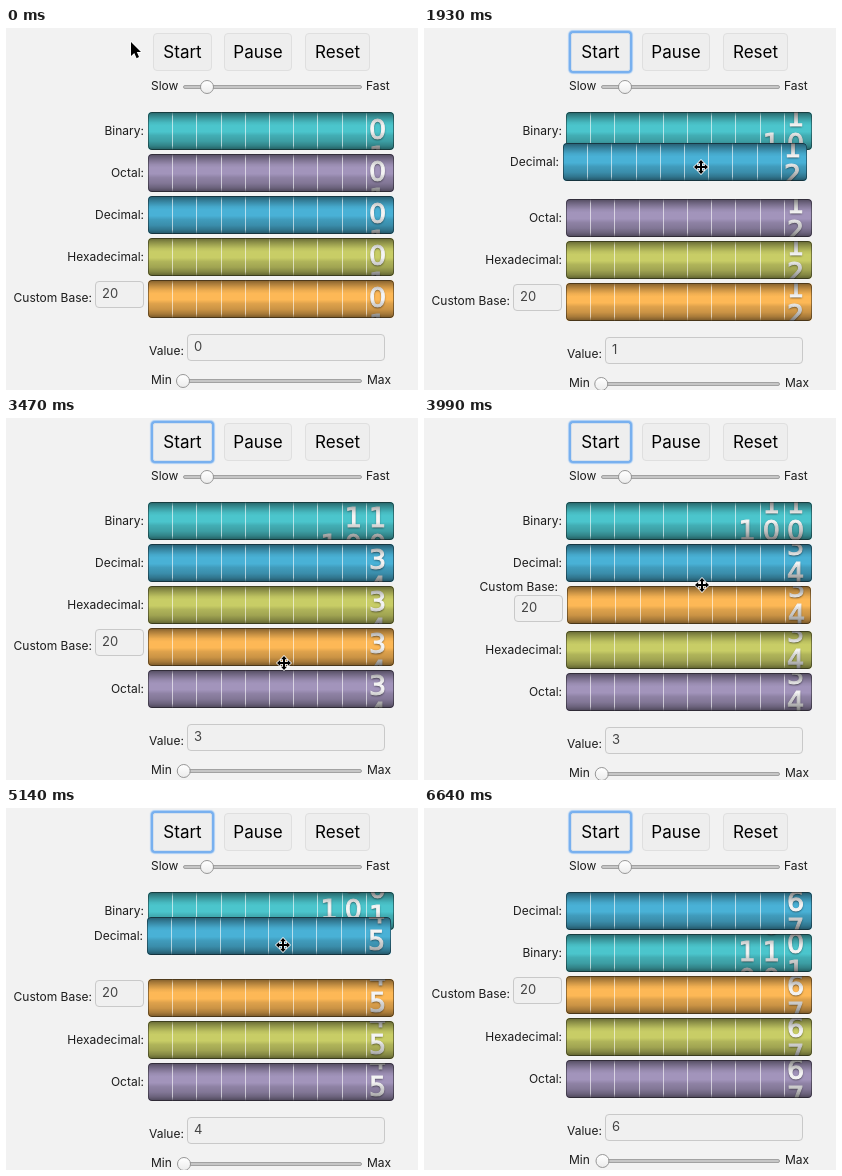
These frames come from a looping animation (412 by 362 pixels, 6.69 s). An HTML page:

```html
<!DOCTYPE html>
<html lang="en">
<head>
<meta charset="utf-8">
<title>Counters in five bases</title>
<style>
  html, body { margin: 0; width: 100%; height: 100%; overflow: hidden; }
  body { background: #f2f2f2; color: #1c1c1c; font: 12px/16px Inter, sans-serif; }
  #stage { position: relative; width: 412px; height: 362px; overflow: hidden; }
  #stage div, #stage span, #stage svg { position: absolute; box-sizing: border-box; }
  #stage span { white-space: pre; }

  .button {
    top: 5px; height: 38px; border: 1px solid #dfdfdf; border-radius: 4px;
    background: #eee; color: #000; font-size: 17px; line-height: 37px; text-align: center;
  }
  .button.focus {
    border-color: #d5e0ec; border-radius: 2px;
    box-shadow: 0 0 0 2px #78b0ef, 0 0 1px 3px #a9cdf4;
  }

  .field {
    height: 27px; border: 1px solid #c9c9c9; border-radius: 4px; background: #f0f0f0;
    color: #444; font-size: 13px; line-height: 23px; padding-left: 6px;
  }
  .track {
    left: 177px; width: 179px; height: 4px; border: 1px solid #a2a2a2;
    border-radius: 2px; background: #c6c6c6;
  }
  .knob {
    width: 14px; height: 14px; border: 1px solid #979797; border-radius: 50%;
    background: linear-gradient(#fff, #ececec);
  }

  .row { left: 0; top: 0; width: 412px; height: 38px; }
  .row.lifted { z-index: 2; }
  .label { right: 274px; top: 11px; }
  .custom .label { right: 326px; top: 10px; }
  .custom .field { left: 89px; top: 1px; width: 49px; }
  .custom.lifted .label { right: 279px; top: -7px; }
  .custom.lifted .field { top: 9px; }

  .bar { left: 142px; top: 0; width: 246px; height: 38px; border-radius: 4px; overflow: hidden; }
  .lifted .bar { width: 244px; }
  .bar::before, .bar::after { content: ""; position: absolute; inset: 0; border-radius: 4px; }
  .bar::before {
    z-index: 1;
    background: linear-gradient(rgba(0,0,0,.5), rgba(0,0,0,.34) 9%, rgba(0,0,0,.2) 18%,
      rgba(0,0,0,.06) 28%, rgba(0,0,0,0) 36%, rgba(0,0,0,0) 52%, rgba(0,0,0,.12) 62%,
      rgba(0,0,0,.2) 77%, rgba(0,0,0,.34) 89%, rgba(0,0,0,.54));
    box-shadow: inset 0 0 0 1px rgba(0,0,0,.4);
  }
  .bar::after {
    z-index: 2; left: 1.3px; width: 219px;
    background: repeating-linear-gradient(90deg, transparent 0 23.2px, rgba(255,255,255,.6) 23.2px 24.2px);
    -webkit-mask: linear-gradient(transparent, #000 12%, #000 88%, transparent);
    mask: linear-gradient(transparent, #000 12%, #000 88%, transparent);
  }
  #stage .wheel {
    top: 4px; width: 24.2px; text-align: center; white-space: pre; color: #f4f4f4;
    font: 27px/27px "DejaVu Sans", Verdana, sans-serif;
    -webkit-text-stroke: 1.1px #f4f4f4; text-shadow: 0 1px 2px rgba(0,0,0,.7);
  }
  #cursor { left: 0; top: 0; width: 0; height: 0; z-index: 3; }
  #cursor svg { overflow: visible; width: 1px; height: 1px; }
  #cursor path { fill: #000; stroke: #fff; stroke-width: 1.6; paint-order: stroke; stroke-linejoin: round; }
</style>
</head>
<body>
<div id="stage">
  <div class="button" id="start" style="left:147px;width:59px">Start</div>
  <div class="button" style="left:218px;width:68px">Pause</div>
  <div class="button" style="left:299px;width:65px">Reset</div>

  <span style="left:145px;top:50px">Slow</span>
  <div class="track" style="top:57px"></div>
  <div class="knob" style="left:194px;top:52px"></div>
  <span style="left:360px;top:50px">Fast</span>

  <div id="rows"></div>

  <div id="footer" style="left:0;top:0">
    <span style="left:143px;top:315px">Value:</span>
    <div class="field" id="value" style="left:181px;top:306px;width:198px">0</div>
    <span style="left:145px;top:344px">Min</span>
    <div class="track" style="top:351px"></div>
    <div class="knob" id="amount" style="left:170px;top:346px"></div>
    <span style="left:361px;top:344px">Max</span>
  </div>

  <div id="cursor">
    <svg id="arrow"><path d="M0 0V14L3.3 11L5.6 16.2L8 15.1L5.8 10.1H10Z"/></svg>
    <svg id="cross"><path d="M0-7L3-3.8H1V-1H3.8V-3L7 0L3.8 3V1H1V3.8H3L0 7L-3 3.8H-1V1H-3.8V3L-7 0L-3.8-3V-1H-1V-3.8H-3Z"/></svg>
  </div>
</div>

<script>
const LOOP = 6690, CLICK = 475, RATE = 1.02 / 1000;
const TOP = 84, PITCH = 42, STEP = 27, COLUMN = 24.2, GAP = 3;
const $ = id => document.getElementById(id);

const rows = {
  B: { name: "Binary", base: 2, color: "#4bc5cc" },
  O: { name: "Octal", base: 8, color: "#a294bb" },
  D: { name: "Decimal", base: 10, color: "#49b1d6" },
  H: { name: "Hexadecimal", base: 16, color: "#c8cd66" },
  C: { name: "Custom Base", base: 20, color: "#fdb856" }
};

// Row order from each time on; a lifted row's slot is its placeholder.
const orders = [
  [0, "BODHC"], [1760, "BDOHC"], [2870, "BDHOC"],
  [3050, "BDHCO"], [3840, "BDCHO"], [5270, "DBCHO"]
];

// dy is how far the pointer sits below the top of the lifted bar.
const drags = [
  { key: "D", from: 1500, to: 2110, dx: -3, dy: 24 },
  { key: "O", from: 2420, to: 3250, dx: -1, dy: 28 },
  { key: "C", from: 3600, to: 4230, dx: 1, dy: -1 },
  { key: "D", from: 4850, to: 5690, dx: -1, dy: 28 }
];

// Pointer path: time, x, y
const path = [
  [0, 125, 14], [60, 125, 14], [220, 140, 3], [450, 158, 17], [740, 160, 18],
  [1310, 278, 191], [1500, 278, 191], [1930, 277, 139], [2110, 277, 148],
  [2420, 277, 196], [2780, 277, 230], [3160, 277, 279], [3280, 277, 280],
  [3600, 278, 225], [3990, 278, 167], [4230, 278, 166], [4700, 277, 154],
  [4850, 277, 154], [5140, 277, 137], [5450, 277, 112], [5690, 277, 112],
  [6250, 386, 292], [6560, 387, 385], [LOOP, 387, 385]
];

function add(parent, className, text = "") {
  const el = document.createElement("div");
  el.className = className;
  el.textContent = text;
  return parent.appendChild(el);
}

function build(key) {
  const row = rows[key];
  row.el = add($("rows"), "row");
  row.el.classList.toggle("custom", key === "C");
  add(row.el, "label", row.name + ":");
  if (key === "C") add(row.el, "field", "20");
  const bar = add(row.el, "bar");
  bar.style.backgroundColor = row.color;
  row.wheels = [];
  for (let unit = 1, place = 0; unit < 8; unit *= row.base, place++) {
    const digits = [];
    for (let i = 0; i <= 8 / unit; i++)
      digits.push(place && !i ? " " : (i % row.base).toString(row.base));
    const el = add(bar, "wheel", digits.join("\n"));
    el.style.left = 217.4 - place * COLUMN + "px";
    row.wheels.push({ el, unit });
  }
}

function pointerAt(t) {
  const i = path.findIndex(p => p[0] > t);
  const [t0, x0, y0] = path[i - 1], [t1, x1, y1] = path[i];
  const u = (t - t0) / (t1 - t0), e = u * u * (3 - 2 * u);
  return { x: x0 + (x1 - x0) * e, y: y0 + (y1 - y0) * e };
}

function move(el, x, y) {
  el.style.transform = `translate(${x}px, ${y}px)`;
}

// A wheel turns only while the count carries into its place.
function turn(wheel, count) {
  const n = Math.floor(count);
  const now = Math.floor(n / wheel.unit), next = Math.floor((n + 1) / wheel.unit);
  const pos = now + (next > now ? count - n : 0);
  move(wheel.el, 0, -STEP * pos);
  wheel.el.style.visibility = wheel.unit > 1 && !pos ? "hidden" : "visible";
}

function draw(t) {
  const count = Math.max(0, t - CLICK) * RATE, value = Math.floor(count);
  const order = orders.filter(o => o[0] <= t).pop()[1];
  const drag = drags.find(d => t >= d.from && t < d.to);
  const pointer = pointerAt(t);
  const hole = drag ? order.indexOf(drag.key) : 9;

  [...order].forEach((key, slot) => {
    const { el, wheels } = rows[key];
    const lifted = slot === hole;
    el.classList.toggle("lifted", lifted);
    if (lifted) move(el, drag.dx, Math.round(pointer.y - drag.dy));
    else move(el, 0, TOP + PITCH * slot + (slot > hole ? GAP : 0));
    wheels.forEach(w => turn(w, count));
  });

  $("start").classList.toggle("focus", t >= CLICK);
  $("value").textContent = value;
  move($("amount"), value * 0.25, 0);
  move($("footer"), 0, drag ? GAP : 0);

  const overRows = pointer.y > TOP && pointer.y < 290 && pointer.x < 380;
  move($("cursor"), Math.round(pointer.x), Math.round(pointer.y));
  $("cross").style.display = overRows ? "" : "none";
  $("arrow").style.display = overRows ? "none" : "";
}

Object.keys(rows).forEach(build);
draw(0);
const begin = performance.now();
requestAnimationFrame(function tick() {
  draw((performance.now() - begin) % LOOP);
  requestAnimationFrame(tick);
});
</script>
</body>
</html>
```
